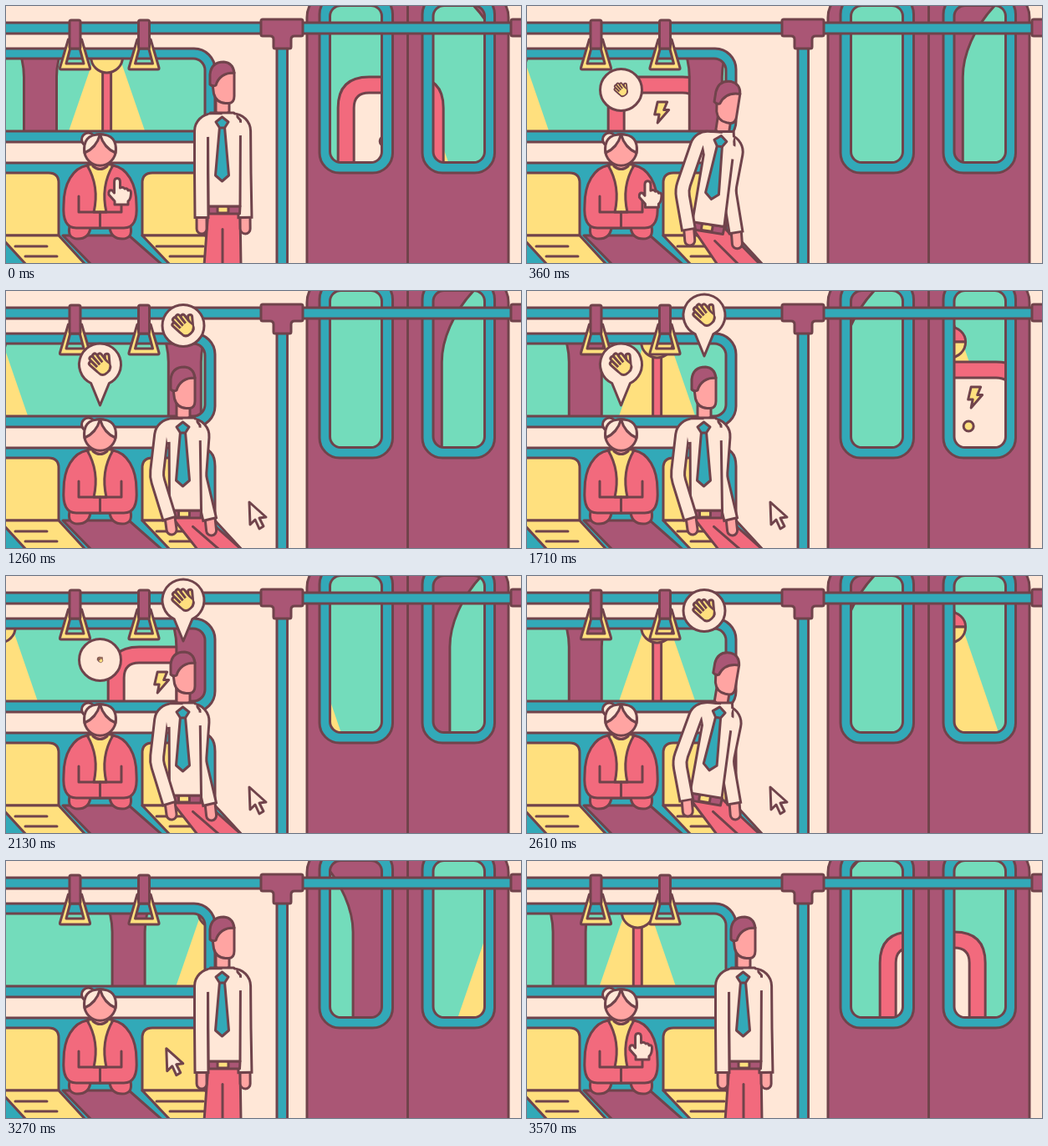
An HTML page with a canvas for the animation above (3.6 s loop, 616 by 308 pixels).

```html
<!DOCTYPE html>
<html lang="en">
<head>
<meta charset="utf-8">
<title>Train carriage</title>
<style>
html, body { margin: 0; width: 100%; height: 100%; overflow: hidden; background: #ffe7d7; }
canvas { display: block; width: 616px; height: 308px; }
</style>
</head>
<body>
<canvas id="stage"></canvas>
<script>
const LOOP = 3600;
const INK = '#70434b', CREAM = '#ffe7d7', PLUM = '#aa5675', TEAL = '#32a9b8',
      MINT = '#73dcbb', YELLOW = '#ffe07e', RED = '#f26a7d', SKIN = '#ffa4a2';
const canvas = document.getElementById('stage');
const ctx = canvas.getContext('2d');
const dpr = window.devicePixelRatio || 1;
canvas.width = 616 * dpr;
canvas.height = 308 * dpr;

const clamp = x => Math.min(1, Math.max(0, x));
const ease = x => x < 0.5 ? 4 * x ** 3 : 1 - 4 * (1 - x) ** 3;
const seg = (t, a, b) => ease(clamp((t - a) / (b - a)));
const lerp = (a, b, k) => a + (b - a) * k;
const mod = (a, n) => ((a % n) + n) % n;

const cache = {};
const path = d => cache[d] || (cache[d] = new Path2D(d));

function shape(d, fill, line = true) {
  const p = typeof d === 'string' ? path(d) : d;
  if (fill) { ctx.fillStyle = fill; ctx.fill(p, 'evenodd'); }
  if (line) stroke(p, INK, 3);
}
function stroke(p, color, width) {
  ctx.strokeStyle = color;
  ctx.lineWidth = width;
  ctx.stroke(p);
}
function box(x, y, w, h, r, fill, line) {
  const p = new Path2D();
  p.roundRect(x, y, w, h, r);
  shape(p, fill, line);
}
function disc(x, y, r, fill, line) {
  const p = new Path2D();
  p.arc(x, y, r, 0, 7);
  shape(p, fill, line);
}
function at(x, y, angle, scale, draw) {
  ctx.save();
  ctx.translate(x, y);
  ctx.rotate(angle);
  ctx.scale(scale, scale);
  draw();
  ctx.restore();
}
// A thick line with an ink edge
function limb(p, width, fill) {
  stroke(p, INK, width);
  stroke(p, fill, width - 6);
}

// ---- Outside the windows ----
const glass = new Path2D();
glass.roundRect(-40, 63, 278, 87, 14);
glass.roundRect(387.5, -0.5, 62, 188, 13);
glass.roundRect(511, -0.5, 61.5, 188, 13);

function lamp() {
  shape('M-15 61H15L59 189H-59Z', YELLOW, false);
  box(-5, 78, 10, 122, 0, RED);
  box(-6, 38, 12, 12, 6, RED);
  shape('M-19 61A19 18 0 0 1 19 61Z', RED);
  shape('M-19 61A19 19 0 0 0 19 61Z', YELLOW);
}
function pillar() {
  shape('M-19.5 200V85C-19.5 60 -32 26 -60 -3V-8H60V-3C32 26 19.5 60 19.5 85V200Z', PLUM);
}
function arch() {
  shape('M-63 200V122Q-63 85 -26 85H26Q63 85 63 122V200Z', RED);
  shape('M-44 200V122Q-44 104 -26 104H26Q44 104 44 122V200Z', CREAM);
  shape('M-4 115H7.5L3.500 124.500H9.500L-4 140L-2 130H-7.500Z', YELLOW);
  disc(-7, 162, 6, YELLOW);
}
function outside(t) {
  ctx.save();
  ctx.clip(glass);
  ctx.fillStyle = MINT;
  ctx.fillRect(0, 0, 616, 200);
  const lap = t / 900;
  const row = (x0, gap, draw) => {
    for (let x = mod(x0 - gap * lap, gap) - gap; x < 690; x += gap) at(x, 0, 0, 1, draw);
  };
  row(121, 350, lamp);
  at(mod(461 - 750 * lap + 600, 1500) - 600, 0, 0, 1, arch);
  row(41.3, 288, pillar);
  ctx.restore();
  shape(glass);
}

// ---- Carriage ----
function walls() {
  box(-40, 51, 290, 112, 25, TEAL);
  shape('M360 320V14Q360 2 367 -6H594Q601 2 601 14V320Z', PLUM);
  shape('M480.5 -5V320');
  box(375, -14, 87.5, 214, 24, TEAL);
  box(498, -14, 86.5, 214, 24, TEAL);
}
function seats() {
  shape('M-5 188H230Q250 188 250 210V275L284 312H-5Z', TEAL);
  shape('M-5 200H51Q63 200 63 212V275H-5Z', YELLOW);
  shape('M163 275V212Q163 200 175 200H226Q238 200 238 212V275Z', YELLOW);
  shape('M-8 275H63L97 312H26Z', YELLOW);
  shape('M163 275H238L272 312H198Z', YELLOW);
  shape('M11 288H49M23 300H61M180 288H236M196 300H246');
  shape('M68 275H147L189 312H104Z', PLUM);
}
function rails() {
  box(-5, 20, 626, 13, 0, TEAL);
  box(324, 40, 12.5, 280, 0, TEAL);
  shape('M307 16H353Q355 16 355 18V34Q355 36 353 36H345Q341 36 341 40V49Q341 51 339 51H322Q320 51 320 49V40Q320 36 316 36H307Q305 36 305 34V18Q305 16 307 16Z', PLUM);
  box(604, 16, 30, 20, 2, PLUM);
  for (const x of [82.5, 165]) at(x, 0, 0, 1, () => {
    shape('M-8 40H8L18 74Q18.500 76 16.500 76H-16.500Q-18.500 76 -18 74ZM-5 48L-10.500 69H10.500L5 48Z', YELLOW);
    box(-6.5, 17, 13, 34, 2, PLUM);
  });
}

// ---- People ----
function woman() {
  shape('M76 264Q73 279 86 279Q99 279 101 266H124Q126 279 139 279Q152 279 149 264Z', RED);
  shape('M98 190H127L124 250H101Z', YELLOW);
  shape('M104 184V192Q112.500 199 121 192V184Z', SKIN);
  shape('M97 191C80 194 69 213 69 238Q67 266 84 266H112.500V247H105Q112 216 97 191Z', RED);
  shape('M128 191C145 194 156 213 156 238Q158 266 141 266H112.500V247H120Q113 216 128 191Z', RED);
  shape('M87 228V247H138V228');
  disc(98.5, 160, 8, CREAM);
  disc(112.5, 172.5, 18.8, SKIN);
  shape('M112.500 154Q108 170 94 176Q91 154 112.500 153.700Q134 154 131 176Q117 170 112.500 154Z', CREAM);
}

// neck, hip, then shoulder, elbow, wrist for each arm, then feet; lean in radians
const STAND = { a: 0, p: [258.5, 128, 261, 244, 233.5, 137, 233.5, 200, 234, 255, 284.5, 137, 285, 200, 286, 255, 237, 281] };
const LEAN = { a: 0.165, p: [231.5, 152, 214, 267, 205, 159, 182, 222, 191, 270, 250, 168, 239, 222, 248, 274, 228, 280] };
const SIT = { a: 0, p: [211.5, 152, 214.5, 267, 187, 161, 180, 222, 196, 274, 236, 161, 231.5, 222, 244, 275, 230, 283] };
const POSES = [[0, STAND], [150, STAND], [430, LEAN], [700, SIT], [2340, SIT], [2610, LEAN], [3000, STAND], [LOOP, STAND]];

function head() {
  shape('M-7.500 -24V-1Q0 6 8.500 -1V-18Z', SKIN);
  shape('M-12 -38L-10 -23Q-7 -12 4 -11.500H8Q14.500 -12 14.500 -20V-48H-8Z', SKIN);
  shape('M-14.500 -34V-46Q-13 -61 2 -61Q13 -60 14.500 -48Q-3 -48 -7.500 -33Q-11 -31 -14.500 -34Z', PLUM);
}
function tie() {
  shape('M-3 17H3L8 75L0 82L-8 75Z', TEAL);
  shape('M0 5L7.500 11L3 18H-3L-7.500 11Z', TEAL);
}
function man(t) {
  let i = 0;
  while (i < POSES.length - 2 && t >= POSES[i + 1][0]) i++;
  const [t0, from] = POSES[i], [t1, to] = POSES[i + 1];
  const k = seg(t, t0, t1);
  const a = lerp(from.a, to.a, k);
  const [nx, ny, hx, hy, lx, ly, lex, ley, lwx, lwy, rx, ry, rex, rey, rwx, rwy, fl, fr] =
    from.p.map((v, j) => lerp(v, to.p[j], k));
  const chestY = ny + 9;

  function arm(sx, sy, ex, ey, wx, wy) {
    const hand = new Path2D(), d = 7 / Math.hypot(wx - ex, wy - ey);
    hand.moveTo(wx, wy - 3);
    hand.lineTo(wx + (wx - ex) * d, wy + 12);
    limb(hand, 15, SKIN);
    const sleeve = cuff => {
      const p = new Path2D();
      p.moveTo(lerp(wx, ex, cuff), lerp(wy, ey, cuff));
      p.arcTo(ex, ey, sx, sy, 30);
      p.arcTo(sx, sy, nx, chestY, 13);
      p.lineTo(nx, chestY);
      return p;
    };
    ctx.lineCap = 'butt';
    stroke(sleeve(0), INK, 19);
    stroke(sleeve(0.055), CREAM, 13);
    ctx.lineCap = 'round';
  }

  const mid = (fl + fr) / 2;
  shape(new Path2D(`M${hx - 19} ${hy}H${hx + 19}L${fr} 311H${fl}Z`), RED);
  shape(new Path2D(`M${lerp(hx - 2, mid, 0.25)} ${lerp(hy, 311, 0.35)}L${mid} 311`));

  at(nx, ny, a, 1, head);
  arm(rx, ry, rex, rey, rwx, rwy);
  at(hx, hy, a, 1, () => {
    shape('M-19 -4H19L18.500 5H-18.500Z', PLUM);
    box(-8, -4, 13, 8, 2, YELLOW);
  });
  shape(new Path2D(`M${nx - 14} ${ny}L${lx + 8} ${ly}L${hx - 19} ${hy - 4 - 19 * a}L${hx + 19} ${hy - 4 + 19 * a}L${rx - 4} ${ry}L${nx + 14} ${ny}Z`), CREAM);
  arm(lx, ly, lex, ley, lwx, lwy);

  // The sleeves join over the chest
  const yoke = new Path2D();
  yoke.moveTo(lerp(lx, nx, 0.35), lerp(ly, chestY, 0.35));
  yoke.lineTo(nx, chestY);
  yoke.lineTo(lerp(rx, nx, 0.35), lerp(ry, chestY, 0.35));
  ctx.lineCap = 'butt';
  stroke(yoke, CREAM, 13);
  ctx.lineCap = 'round';
  shape(new Path2D(`M${lx + 3} ${ly + 3}L${nx} ${chestY}L${rx - 2} ${ry + 3}V${ry + 18}L${lx + 6} ${ly + 20}Z`), CREAM, false);

  at(nx, ny, a, 1, tie);
}

// ---- Bubbles and pointer ----
function wave() {
  const line = (x1, y1, x2, y2) => limb(path(`M${x1} ${y1}L${x2} ${y2}`), 8, YELLOW);
  shape('M-8 -1H8V7Q8 13 0 13Q-8 13 -8 7Z', YELLOW);
  line(6, 7, 13, -2);
  line(-6, 3, -7, -8);
  line(-2, 2, -2.5, -12);
  line(2, 2, 2.5, -12);
  line(6, 3, 7, -8);
  shape('M-7 0H7L8 7Q6 11 0 11.500Q-7 11 -7 5Z', YELLOW, false);
}
function bubble(t, x, y, open, close) {
  const size = seg(t, open, open + 260) - seg(t, close + 400, close + 640);
  const icon = seg(t, open + 220, open + 480) - seg(t, close + 160, close + 430);
  const tail = seg(t, open + 560, open + 720) - seg(t, close, close + 160);
  if (size <= 0.005) return;
  at(x, y - 12.5 * tail, 0, 1, () => {
    const r = 25 * size;
    if (tail > 0.01) {
      const p = new Path2D();
      p.arc(0, 0, r, 2.02, 1.12);
      p.lineTo(0, lerp(25, 49, tail));
      p.closePath();
      shape(p, CREAM);
    } else disc(0, 0, r, CREAM);
    if (icon > 0.01) at(0, 0, -0.75, icon, wave);
  });
}
function pointer(t) {
  const k = seg(t, 180, 870) - seg(t, 2910, 3570);
  const x = lerp(133, 291, k), y = lerp(208, 253, k);
  at(x, y, 0, 1, () => x < 157
    ? shape('M-3.500 3Q-3.500 -1.500 0 -1.500Q3.500 -1.500 3.500 3V10Q7 8 9 11Q12 10 13 13Q17 12 16.500 17Q16 24 13 26V30H-3V26L-10 18Q-11 12 -6 13L-3.500 16Z', CREAM)
    : shape('M0 0L1 27L7 21L12 32L17 29L12 19L20 18Z', CREAM));
}

function draw(t) {
  ctx.setTransform(dpr, 0, 0, dpr, 0, 0);
  ctx.lineJoin = ctx.lineCap = 'round';
  ctx.fillStyle = CREAM;
  ctx.fillRect(0, 0, 616, 308);
  walls();
  outside(t);
  seats();
  rails();
  woman();
  man(t);
  bubble(t, 112.5, 100.5, 0, 1810);
  bubble(t, 212, 41.5, 680, 2440);
  pointer(t);
}

const start = performance.now();
function tick() {
  draw((performance.now() - start) % LOOP);
  requestAnimationFrame(tick);
}
tick();
</script>
</body>
</html>
```
